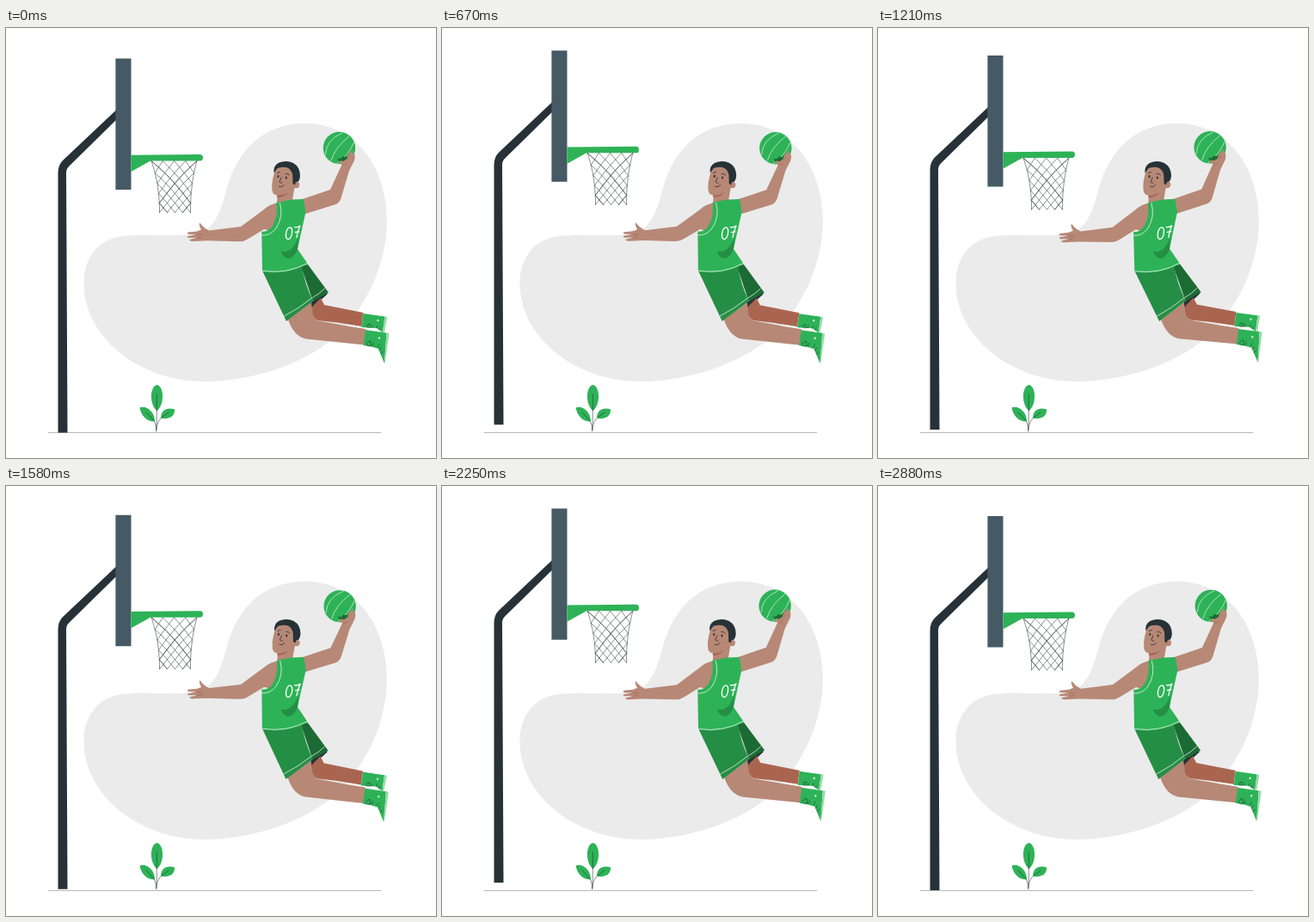
These frames come from a looping animation (500x500 px, 2930 ms). An HTML page:

```html
<!DOCTYPE html>
<html lang="en">
<head>
<meta charset="utf-8">
<title>Slam dunk</title>
<style>
  html, body { margin: 0; width: 100%; height: 100%; overflow: hidden; background: #fff; }
  svg { display: block; width: 100%; height: 100%; }
  .green { fill: #2eb257; }
  .shade { fill: #258e45; }
  .deep { fill: #1c6b34; }
  .dark { fill: #263238; }
  .skin { fill: #b78876; }
  .back-skin { fill: #aa6550; }
  .sole { fill: #97d9ab; }
  .line { fill: none; stroke: #263238; stroke-width: .55; stroke-linecap: round; stroke-linejoin: round; }
  .trim { fill: none; stroke: #fff; stroke-width: .7; stroke-linecap: round; stroke-linejoin: round; }
</style>
</head>
<body>
<svg viewBox="0 0 500 500">
  <path fill="#ebebeb" d="M348 111C300 111 271 141 258.500 181C251 207 246 233 222 239C195 244 162 238 130 243C105 248 90 270 90.500 298C91 340 120 373 152 391C179 406 208 412 238 411C291 409 347 390 383 359C422 322 443 271 443 223C442 157 403 111 348 111Z"/>

  <path fill="#6f7476" d="M49 470.200H330V470.850H49Z"/>
  <path fill="#6f7476" d="M330 470.300H436V470.650H330Z"/>

  <g id="plant">
    <path class="line" d="M174.700 469Q175.500 456 175.300 444M174.800 468Q175 460 171 456M174.800 467Q175 457 183 451"/>
    <path class="green" d="M175.500 445C167 439 166.500 417 175.500 415C184.500 417 184 439 175.500 445Z"/>
    <path class="green" d="M173 457.500C163 458 157 450 155.500 441.500C163 438.500 173 446 173 457.500Z"/>
    <path class="green" d="M180 453.500C180 444 188 440.500 196 443.500C197 451 189 456 180 453.500Z"/>
    <path class="line" d="M175.300 445V426M172.500 457L163 447M181 453L189 447"/>
  </g>

  <g id="hoop">
    <path class="dark" d="M128 95L66 153.500Q60.500 159 60.500 168V470H71.500L70 168Q70 163 73.500 160L128 106.500Z"/>
    <path fill="#455a64" d="M127.400 35H145.500V187.500H127.400Z"/>
    <path id="net" class="line"/>
    <path class="green" d="M145.500 147.200L225.500 146.500Q229 146.500 229 150.300Q229 154 225.500 154H168L145.500 166.500Z"/>
  </g>

  <g id="player">
    <!-- far leg -->
    <path class="dark" d="M350 324L356 325.500L374 309L368 306Z"/>
    <path class="back-skin" d="M353 328L358 322L366 314L370 322L415.500 331L413.500 347L385 342.500L362 340Q357 337 353 328Z"/>
    <path class="deep" d="M343 277L351 275L375 307.500L357 318Z"/>
    <path class="trim" d="M356.500 313.500Q364 309.500 370.500 303"/>
    <path class="green" d="M415.500 332L440.500 335.500L438 354L431 349L413.500 348Z"/>
    <path class="sole" d="M440.500 335.300L443.300 336.200L440 353.500L438 354Z"/>
    <circle cx="432.500" cy="340" r="1.200" fill="#d5efdc"/>
    <path class="line" d="M424 345C421 343 418 346 420 348C423 350 425 346 422 345M424 348Q427 349 426 346M431 349L432 346M434 351L435 348.500"/>

    <!-- near leg -->
    <path class="skin" d="M328 339L355 319L357 334L361 340L400 347L418.500 350L416.500 368.500L349 361.500Q335 359 328 339Z"/>
    <path class="green" d="M418 351L442.500 354.500L440 390L433 373Q425 370 415.500 369Z"/>
    <path class="sole" d="M442.500 354.300L445.500 355L440.500 390.500L440 388Z"/>
    <circle cx="434" cy="360.500" r="1.200" fill="#d5efdc"/>
    <path class="line" d="M425 365C422 362 418 366 420 369C424 372 426 367 423 365M424 369Q428 370 427 366M432 371L434 367.500M434 375L436 371.500M436 379L438 376"/>

    <path class="shade" d="M298 282Q325 287 344 276Q347 297 357 317.500L326 341Z"/>
    <path class="trim" d="M323.500 335Q341 326 355.500 314"/>

    <!-- ball and raised arm -->
    <circle class="green" cx="387.500" cy="139.500" r="18.700"/>
    <path class="trim" style="stroke-width:.6" d="M371.500 147Q372 130 391 122M378 154Q383 138 399 126M385 157.500Q398 149 404.500 133"/>
    <path class="deep" d="M385 151Q388 154 392 149Q395 152 399 145L399 153Q393 159 388 157Z"/>
    <path class="skin" d="M340 200.500L377 188L390.500 159L387 156Q388 153 392 155L396 152.500L397.500 147.500L402.500 142L403.500 146L405.500 147Q406.500 152 403.500 157L399 166L389.500 198Q387.500 204 382 205.500L345 217Z"/>
    <path fill="none" stroke="#aa6550" stroke-width=".6" d="M397 153L400 149M391 159Q395 160 397 157"/>

    <!-- reaching arm -->
    <path class="skin" d="M317 203Q306 205 300 211L273 231L236 235.500Q229 232 225.500 226.500Q223.500 228 227 234.500L222 236.500L211.500 237.500Q210 239 212 239.800L221 240.200L211 242.200Q210.500 244 213 244L222 243.800L213 246.300Q214 248.500 218 248L234 247.300L271 248.200Q277 248.300 281 245.500L300 234L316 238L325 215Z"/>
    <path fill="none" stroke="#8f5d4b" stroke-width=".5" d="M222 240.200L229 240.500M222 244L228 243.500"/>

    <!-- neck and jersey -->
    <path class="skin" d="M316 189L336 183L333 200Q325 206 315 203Z"/>
    <path class="back-skin" d="M314.500 194.500Q322 195 328 191Q324 197 315.500 197Z"/>
    <path class="green" d="M314.500 203Q323 201 332 199.500L346 199L348.500 214L339 257L351 274.500Q327 288 298 283L297.300 236.500Q304 238 310 230Q316.500 219 314.500 203Z"/>
    <path class="shade" d="M320 259.500Q333 263 340 243L339 257Q335 268 328 268Q322 267 320 259.500Z"/>
    <path class="trim" d="M318.500 203.500Q323 219 314 233Q307 242 297.500 241M298.500 282.500Q327 286.500 350.500 273.500"/>
    <path class="trim" style="stroke-width:1.300" d="M330.500 232C326 231 323.500 243.500 327.500 245.500C332.500 246.500 334.500 233 330.500 232M335.500 231.500Q338 232.500 342 230Q339 236 338 243.500M336.500 237.500L341 236.800"/>

    <!-- head -->
    <path class="skin" d="M313 165L311 172Q308.500 181 309.500 189Q310 194 316 194.500Q326 194 331 187L334 185.500Q341 188 341.300 182Q341 178.500 337 179L337 162L325 158Z"/>
    <path class="dark" d="M311.500 168.500Q310.500 160.500 317 156.800Q326 153 334 157Q342 161.500 342 172Q341.500 177 339.500 179Q336.500 178 336 182.500L333.500 181L333.300 171Q332 164 326 162Q317 161 314.500 164.500Z"/>
    <path class="line" style="stroke-width:.8" d="M315.500 168.500L318.500 167.500M325 169.500Q328 169 329.500 171M320 174Q319 177 318 179Q319 181 321 180M317.500 184.500Q321 186 323.500 182.500"/>
    <ellipse class="dark" cx="316.500" cy="172.500" rx="1" ry="1.600"/>
    <ellipse class="dark" cx="325.800" cy="174" rx="1" ry="1.600"/>
  </g>
</svg>
<script>
  const LOOP = 2930, FPS = 24, STEPS = 70, CYCLES = 2;
  const hoop = document.getElementById('hoop');
  const player = document.getElementById('player');

  // Strands zigzag between two curved sides; s runs from rim to hem.
  function netPoint(u, s) {
    const drop = Math.pow(s, .9);
    const bend = 1 - Math.pow(1 - drop, 2.2);
    const left = 169 + 9.5 * bend, right = 222 - 7.5 * bend;
    const fold = 1 - Math.abs(1 - (((u % 2) + 2) % 2));
    return (left + (right - left) * fold).toFixed(1) + ' ' + (154 + 60 * drop).toFixed(1);
  }

  function strand(start, slope) {
    const points = [];
    for (let i = 0; i <= 20; i++) points.push(netPoint(start + slope * i / 20, i / 20));
    return 'M' + points.join('L');
  }

  let net = strand(0, 0) + strand(1, 0);
  for (let i = 0; i <= 4; i++) net += strand(i / 4, 1.25) + strand(i / 4, -1.25);
  document.getElementById('net').setAttribute('d', net);

  // Sway: 0 → 1 → -1 → 0 degrees, with constant speed.
  function sway(p) {
    if (p < .25) return p * 4;
    return p < .75 ? 2 - p * 4 : p * 4 - 4;
  }

  function draw(time) {
    const step = Math.floor((time % LOOP + 5) * FPS / 1000) % STEPS;
    const phase = step * CYCLES / STEPS % 1;
    const lift = 10 * (1 - Math.abs(1 - 2 * phase));
    hoop.setAttribute('transform', `translate(0 ${.5 - lift})`);
    player.setAttribute('transform', `rotate(${sway(phase)} 328 255.5)`);
  }

  const begin = performance.now();
  function tick() {
    draw(performance.now() - begin);
    requestAnimationFrame(tick);
  }
  tick();
</script>
</body>
</html>
```
